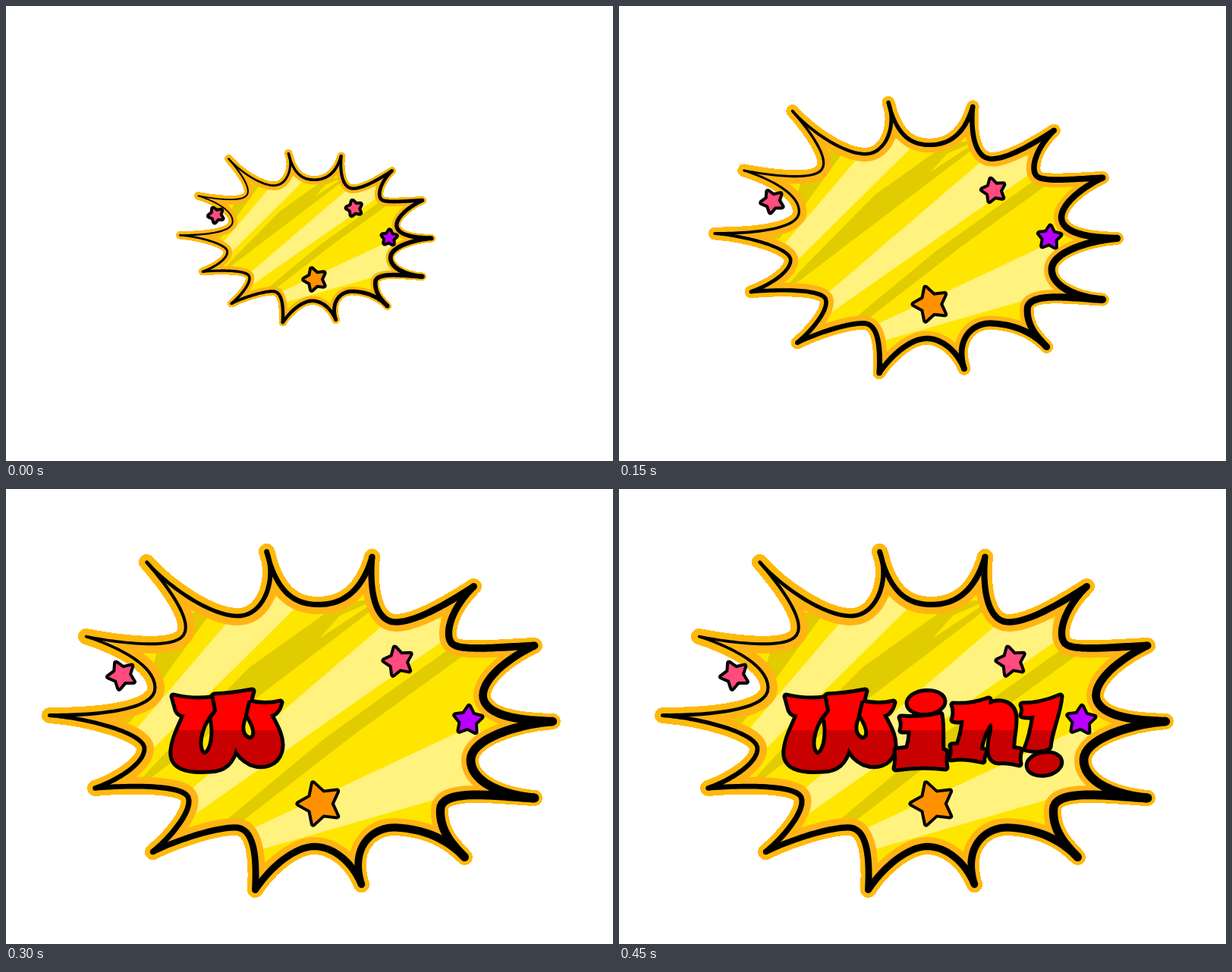
Recreate the animation shown at these times as an HTML page. Size 800 px wide and 600 px high, loop 1000 ms.

```html
<!DOCTYPE html>
<html lang="en">
<head>
<meta charset="utf-8">
<title>Win burst</title>
<style>
  html, body { margin: 0; width: 100%; height: 100%; overflow: hidden; background: #fff; }
  svg { display: block; width: 100vw; height: 100vh; }
  .star { stroke: #000; stroke-width: 8; stroke-linejoin: round; paint-order: stroke; vector-effect: non-scaling-stroke; }
  .letter path, .letter ellipse { fill: url(#red); stroke: #000; stroke-width: 10; stroke-linejoin: round; paint-order: stroke; fill-rule: evenodd; }
  .letter .crack { fill: none; stroke-width: 5; stroke-linecap: round; }
</style>
</head>
<body>
<svg viewBox="-.5 -.5 800 600" role="img" aria-label="Win!">
  <defs>
    <clipPath id="inside"><path class="outline"/></clipPath>
    <linearGradient id="red" gradientUnits="userSpaceOnUse" x1="0" y1="0" x2="0" y2="600">
      <stop offset=".529" stop-color="#f00"/>
      <stop offset=".529" stop-color="#c80000"/>
    </linearGradient>
  </defs>

  <g id="burst">
    <path class="outline" fill="#ffe600" stroke="#ffb90a" stroke-width="21" stroke-linejoin="round" shape-rendering="crispEdges"/>
    <g clip-path="url(#inside)">
      <path fill="#ffe600" d="M0 0H800V600H0Z"/>
      <path fill="#e0cc00" d="M268 165L195 265L162 308L138 304L180 275L200 210L230 160Z
        M428 150L428 158L320 235L205 352L172 388L182 387L478 162L490 145Z
        M595 202L420 328L285 440L305 442L460 322L615 210Z"/>
      <path fill="#ffe600" d="M412 197L440 166L482 148L474 156Z"/>
      <path fill="#fff27f" d="M300 165L166 322L185 350L384 153L375 135Z
        M500 176L236 402L249 428L588 191L570 170L510 165Z
        M622 308L325 447L335 475L600 399L640 380Z"/>
      <path class="outline" fill="none" stroke="#ffb414" stroke-width="25" stroke-linejoin="round"/>
    </g>
    <g id="ink"></g>
    <g id="stars"></g>
  </g>

  <g class="letter">
    <path d="M220 273Q246 279 270 276L274 272Q298 271 324 266L320 281Q342 286 361 281Q357 296 347 297C357 315 365 330 361 345C356 363 338 367 322 361C312 356 305 348 302 340C298 358 288 370 268 370C240 372 216 368 219 343C221 325 230 312 235 297Q228 297 225 291Z
      M269 295C254 314 249 342 260 350C272 350 277 318 269 295Z
      M316 294C305 314 310 329 322 330C334 325 325 307 316 294Z"/>
    <path class="crack" d="M272 275L275 292L269 300M320 281L316 298"/>
  </g>
  <g class="letter">
    <path d="M371 301Q398 303 423 297C426 312 424 330 425 344L430 346Q428 356 430 367Q398 363 364 368Q367 356 365 344L380 342Q384 332 384 318Q377 318 372 318Q375 309 371 301Z"/>
    <ellipse cx="404" cy="281" rx="23" ry="13.5" transform="rotate(-5 404 281)"/>
  </g>
  <g class="letter">
    <path d="M440 284Q462 286 487 277L487 284C505 276 522 284 521 304C521 318 517 332 518 342L528 344Q525 352 527 362Q512 358 500 359C485 358 487 340 490 325C494 310 490 304 486 312C480 322 477 332 475 343L482 345Q478 352 479 358Q455 352 437 355Q441 346 438 338L447 337Q453 320 454 304Q445 306 440 304Q444 294 440 284Z"/>
  </g>
  <g class="letter">
    <path d="M531 284Q556 284 581 273C579 296 568 318 566 340Q553 346 536 342C542 328 545 312 547 298Q538 300 531 298Q534 291 531 284Z"/>
    <ellipse cx="560" cy="362" rx="21" ry="13" transform="rotate(-10 560 362)"/>
  </g>
</svg>
<script>
const NS = 'http://www.w3.org/2000/svg';
const CX = 400.5, CY = 305.5;
const LOOP = 1000, STEP = 50;
const burst = document.getElementById('burst');
const letters = document.querySelectorAll('.letter');

function add(parent, tag, attrs) {
  const el = document.createElementNS(NS, tag);
  for (const key in attrs) el.setAttribute(key, attrs[key]);
  return parent.appendChild(el);
}

// One scalloped arc per row, clockwise: curve ending at a spike, and the pen width there.
const arcs = [
  ['C355 130 375 152 411 152S470 130', '482 89', 8],
  ['C478 130 485 175 513 175S585 148', '616 128', 9],
  ['C585 158 577 192 587 203S650 208', '696 206', 10],
  ['C650 228 620 260 630 280S680 305', '720 306', 11.5],
  ['C670 310 612 330 612 357S650 403', '696 407', 12],
  ['C650 405 573 393 572 422S588 468', '604 485', 11],
  ['C575 455 540 447 512 446S452 470', '468 521', 9.5],
  ['C455 490 430 471 406 471S350 495', '328 528', 9],
  ['C330 490 328 447 303 446S225 462', '193 478', 7.5],
  ['C215 460 245 425 240 407S160 390', '117 394', 6.5],
  ['C150 382 183 360 182 341S110 302', '57 298', 5],
  ['C110 298 196 293 196 262S145 207', '105 194', 3.5],
  ['C140 201 215 212 232 194S212 127', '185 96', 4.5],
  ['C215 130 270 167 305 167S357 118', '343 82', 6.5]
];

// Tapered pen line along a curve.
function ribbon(d, w0, w1) {
  const path = document.createElementNS(NS, 'path');
  path.setAttribute('d', d);
  const len = path.getTotalLength(), n = 48;
  const left = [], right = [];
  for (let i = 0; i <= n; i++) {
    const at = len * i / n;
    const p = path.getPointAtLength(at);
    const a = path.getPointAtLength(Math.max(0, at - 1));
    const b = path.getPointAtLength(Math.min(len, at + 1));
    const half = (w0 + (w1 - w0) * i / n) / 2;
    const size = Math.hypot(b.x - a.x, b.y - a.y) || 1;
    const nx = -(b.y - a.y) / size * half, ny = (b.x - a.x) / size * half;
    left.push((p.x + nx).toFixed(2) + ' ' + (p.y + ny).toFixed(2));
    right.unshift((p.x - nx).toFixed(2) + ' ' + (p.y - ny).toFixed(2));
  }
  return 'M' + left.concat(right).join('L') + 'Z';
}

function drawOutline() {
  const ink = document.getElementById('ink');
  let [, from, w0] = arcs[arcs.length - 1];
  let whole = 'M' + from;
  for (const [curve, tip, w1] of arcs) {
    const piece = curve + ' ' + tip;
    whole += piece;
    add(ink, 'path', { d: ribbon('M' + from + piece, w0, w1) });
    const [cx, cy] = tip.split(' ');
    add(ink, 'circle', { cx, cy, r: w1 / 2 });
    from = tip;
    w0 = w1;
  }
  for (const el of document.querySelectorAll('.outline')) el.setAttribute('d', whole + 'Z');
}

function star(x, y, r, turn, fill) {
  const points = [];
  for (let i = 0; i < 10; i++) {
    const a = (turn + i * 36) * Math.PI / 180;
    const d = i % 2 ? r * 0.54 : r;
    points.push((x + d * Math.cos(a)).toFixed(2) + ',' + (y + d * Math.sin(a)).toFixed(2));
  }
  add(document.getElementById('stars'), 'polygon', { class: 'star', points: points.join(' '), fill });
}

function render(time) {
  const step = Math.floor(time % LOOP / STEP);
  const s = Math.min(1, 0.5 + 0.1 * step);
  burst.setAttribute('transform', `translate(${CX} ${CY}) scale(${s}) translate(${-CX} ${-CY})`);
  letters.forEach((el, i) => el.setAttribute('visibility', step >= 6 + i ? 'visible' : 'hidden'));
}

function tick(now) {
  render(now);
  requestAnimationFrame(tick);
}

drawOutline();
star(152, 245, 17.5, -115, '#ff4b7d');
star(516.5, 227, 18.5, -104, '#ff4b7d');
star(608.5, 304.5, 18, -86, '#b900ff');
star(413, 414.5, 28, -108, '#ff9100');
render(0);
requestAnimationFrame(tick);
</script>
</body>
</html>
```
